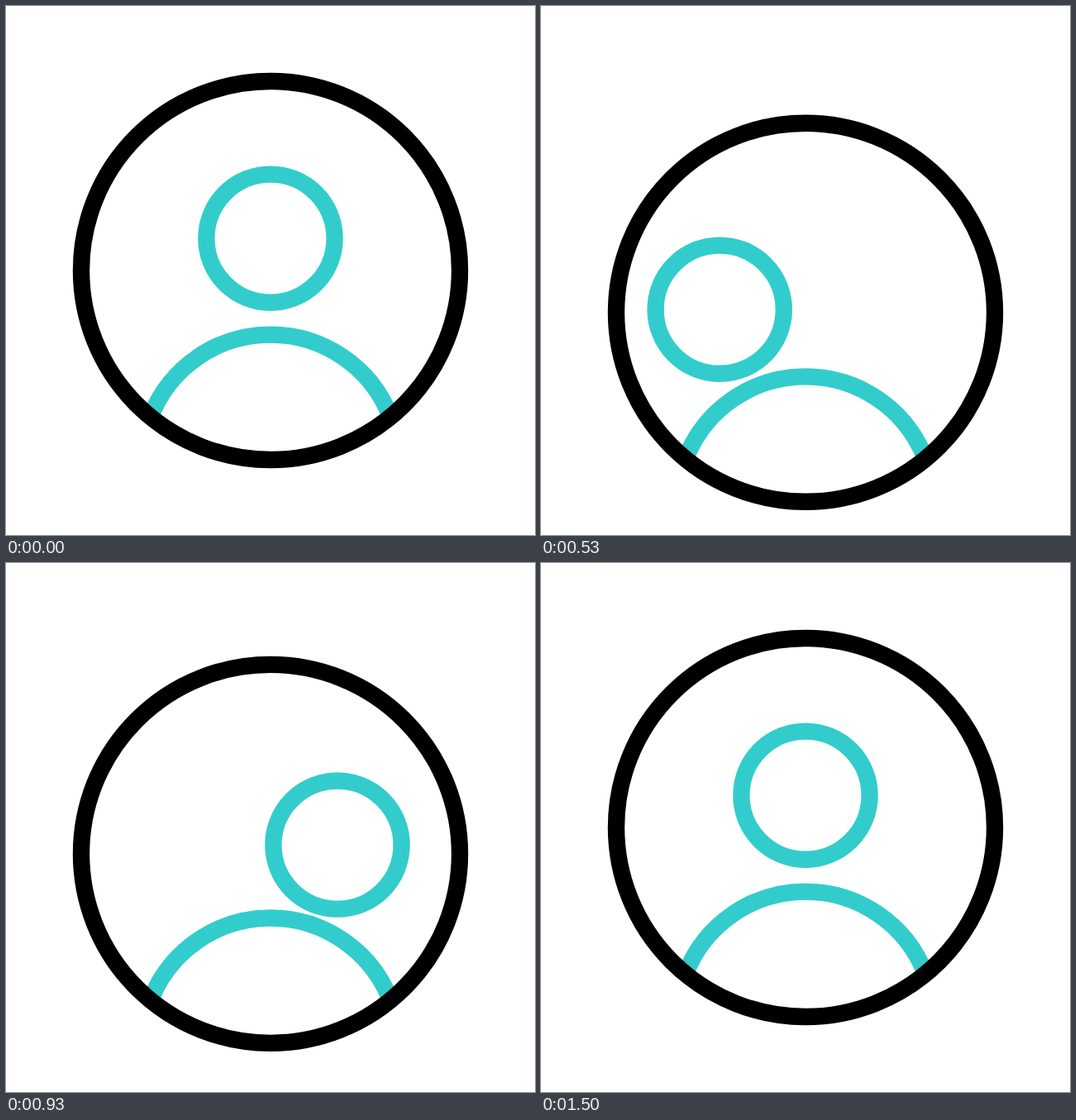
These frames come from a looping animation (640 by 640 pixels, 2000 ms). An HTML page:

```html
<!DOCTYPE html>
<html lang="en">
<head>
<meta charset="utf-8">
<title>Profile icon</title>
<style>
  html, body { margin: 0; height: 100%; overflow: hidden; background: #fff; }
  svg { display: block; width: 100vw; height: 100vh; }
</style>
</head>
<body>
<svg viewBox="0 0 640 640" fill="none" stroke-width="20.4">
  <g id="icon">
    <g stroke="#3cc">
      <circle id="head" cx="320" cy="281.2" r="77.6"/>
      <path d="M174.9 497.2A155.5 155.5 0 0 1 465.1 497.2"/>
    </g>
    <circle cx="320" cy="320" r="229" stroke="#000"/>
  </g>
</svg>
<script>
  const LOOP = 2000, FPS = 30;
  const icon = document.getElementById('icon');
  const head = document.getElementById('head');
  const move = (el, x, y) => el.setAttribute('transform', `translate(${x} ${y})`);

  // Smooth 0 to 1 between two times
  function ramp(t, start, end) {
    const p = Math.min(1, Math.max(0, (t - start) / (end - start)));
    return p * p * (3 - 2 * p);
  }

  // Point on a quadratic curve from a to b, bent towards c
  const curve = (u, a, c, b) =>
    a.map((v, i) => (1 - u) ** 2 * v + 2 * u * (1 - u) * c[i] + u * u * b[i]);

  const rest = [0, 0], left = [-104.8, 35.7], right = [94.7, 25.9];

  // The head rolls left, swings across to the right and returns
  function headAt(t) {
    if (t < 17) return curve(ramp(t, 0, 17), rest, [-54.9, 11.6], left);
    if (t < 30) return curve(ramp(t, 17, 30), left, [-13.5, 43.3], right);
    return curve(ramp(t, 30, 45), right, [48.4, 10.6], rest);
  }

  function draw() {
    const ms = performance.now() % LOOP;
    const t = Math.floor((ms + 3.4) * FPS / 1000);
    move(icon, 0, 56.7 * ramp(t, 0, 20) * (1 - ramp(t, 19.1, 38.5)));
    move(head, ...headAt(t));
    requestAnimationFrame(draw);
  }
  draw();
</script>
</body>
</html>
```
